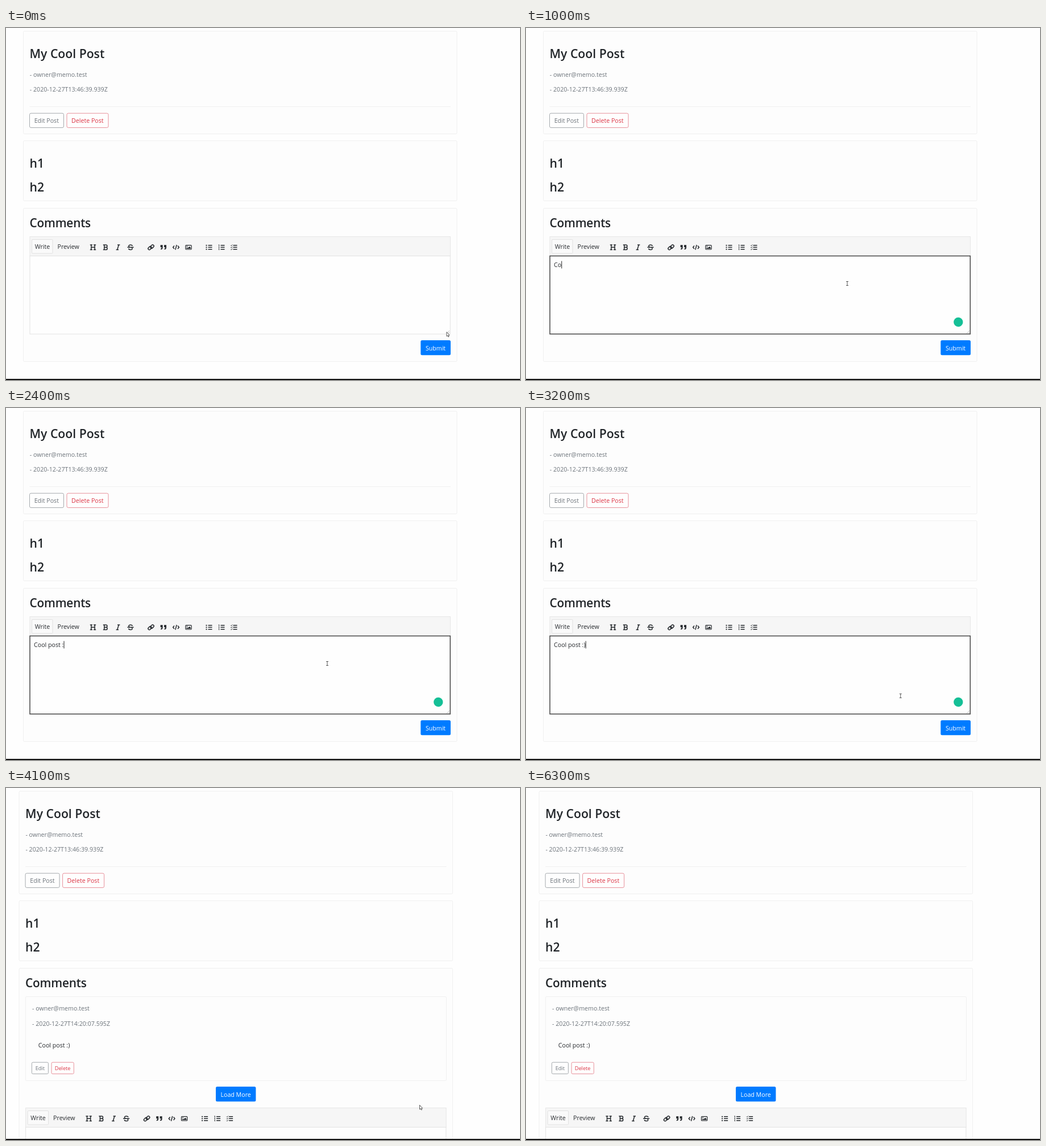
Recreate the animation shown at these times as an HTML page. Size 904 px wide and 620 px high, loop 6.6 s.

```html
<!DOCTYPE html>
<html lang="en">
<head>
<meta charset="utf-8">
<title>Post and comments</title>
<style>
  html, body { margin: 0; width: 100%; height: 100%; overflow: hidden; background: #fefefe; }
  svg { display: block; width: 904px; height: 620px; }
  text { font: 10.65px "Open Sans", "Noto Sans", sans-serif; fill: #26292d; white-space: pre; }
  .head { font-size: 20.8px; font-weight: 600; letter-spacing: -.2px; fill: #212529; }
  .title { font-size: 21.2px; letter-spacing: 0; }
  .muted { fill: #6c737a; }
  .mid { text-anchor: middle; }
  .small { font-size: 9.2px; }
  .white { fill: #fff; }
  .red { fill: #dc3545; }
  .card { fill: #fdfdfd; stroke: #f0f0f0; }
  .line { stroke: #f0f0f0; fill: none; }
  .grey-btn { fill: #fefefe; stroke: #a6aaae; }
  .red-btn { fill: #fefefe; stroke: #e8919b; }
  .blue-btn { fill: #007bff; }
  .icon { fill: none; stroke: #24282c; stroke-width: 1.5; }
  .icon .solid { fill: #24282c; stroke: none; }
</style>
</head>
<body>
<svg viewBox="0 0 904 620">
  <g id="page">
    <rect class="card" x="30.5" y="5.5" width="762.5" height="181" rx="2"/>
    <text class="head title" x="41.5" y="53">My Cool Post</text>
    <text class="muted" x="41.8" y="85.5">- owner@memo.test</text>
    <text class="muted" x="41.8" y="112">- 2020-12-27T13:46:39.939Z</text>
    <path class="line" d="M41.5 138.5H782"/>
    <rect class="grey-btn" x="41.5" y="150.2" width="60" height="25.3" rx="2.5"/>
    <text class="muted mid" x="71.3" y="167">Edit Post</text>
    <rect class="red-btn" x="107" y="150.2" width="73" height="25.3" rx="2.5"/>
    <text class="red mid" x="143.3" y="167">Delete Post</text>

    <rect class="card" x="30.5" y="198.5" width="762.5" height="106" rx="2"/>
    <text class="head title" x="41.5" y="246">h1</text>
    <text class="head title" x="41.5" y="288">h2</text>

    <rect class="card" id="commentCard" x="30.5" y="317.5" width="762.5" height="270" rx="2"/>
    <text class="head" x="41.5" y="350.5">Comments</text>

    <g id="comment">
      <rect class="card" x="41.8" y="367.5" width="740" height="148" rx="2"/>
      <text class="muted" x="53.5" y="392">- owner@memo.test</text>
      <text class="muted" x="53.5" y="419">- 2020-12-27T14:20:07.595Z</text>
      <text x="64.2" y="457">Cool post :)</text>
      <rect class="grey-btn" x="52.8" y="483.2" width="29" height="20.3" rx="2"/>
      <text class="muted mid small" x="67.3" y="497">Edit</text>
      <rect class="red-btn" x="87.5" y="483.2" width="39.2" height="20.3" rx="2"/>
      <text class="red mid small" x="107" y="497">Delete</text>
      <rect class="blue-btn" x="376.4" y="526" width="70.4" height="26.3" rx="2.5"/>
      <text class="white mid" x="411.5" y="543.5">Load More</text>
    </g>

    <g id="editor">
      <rect x="42" y="367.5" width="739.5" height="34" fill="#f6f6f6" stroke="#e6e6e6"/>
      <rect x="45.5" y="372.5" width="36.5" height="24.5" rx="1.5" fill="#fafafa" stroke="#e1e1e1"/>
      <text class="mid" x="64" y="389">Write</text>
      <text class="mid" x="109.7" y="389">Preview</text>
      <g id="tools" class="icon"></g>
      <rect id="area" x="42" y="401.5" width="739.3" height="137.5" fill="#fefefe"/>
      <path d="M775 538l5-5M778 538l2-2" stroke="#aaa" stroke-width=".8"/>
      <text id="typed" x="49" y="421"></text>
      <path id="caret" d="M0 410.5v13" stroke="#222"/>
      <circle id="badge" cx="760.3" cy="518" r="8.2" fill="#15bf96"/>
      <rect id="submit" class="blue-btn" x="729.3" y="550" width="52.7" height="26.3" rx="2.5"/>
      <text class="white mid" x="755.5" y="567.5">Submit</text>
    </g>
  </g>
  <g id="pointer" stroke="#333" stroke-width=".8" fill="#fff" stroke-linejoin="round">
    <path id="arrow" d="M0 0V7.6L1.7 6.1L2.9 8.6L4.1 8.1L3 5.6H5.1Z"/>
    <path id="beam" fill="none" d="M-2-3.5h4M0-3.5v7M-2 3.5h4"/>
    <path id="hand" d="M-.8 6V.7Q0-.5.8.7V4l3 .8q1 .4.8 1.6L4 10H.4L-2.4 6.6Q-2.4 5-.8 6Z"/>
  </g>
  <rect y="618" width="904" height="2" fill="#111"/>
</svg>
<script>
const LOOP = 6600, STEP = 100, POSTED = 4100;
const $ = id => document.getElementById(id);
const show = (id, on) => $(id).setAttribute('visibility', on ? 'visible' : 'hidden');

const stroke = d => `<path d="${d}"/>`;
const solid = d => `<path class="solid" d="${d}"/>`;
const rows = [-3.5, 0, 3.5];
const list = mark => stroke(rows.map(y => `M-1.5 ${y}h7`).join('')) + rows.map(mark).join('');
const quote = 'h4v4.5q0 3.5-3.5 3.5v-1.6q1.6 0 1.6-2.4h-2.1z';

const icons = [
  [153, stroke('M-5.2-4.2h4.2M1-4.2h4.2M-5.2 4.2h4.2M1 4.2h4.2M-3.1-4v8M3.1-4v8M-3 0h6')],
  [175, stroke('M-4.2-4.2H.8a2 2 0 0 1 0 4.2H-2M1 0a2.1 2.1 0 0 1 0 4.2H-4.2M-2.2-4v8')],
  [197, stroke('M-1-4.2h4.4M-3.4 4.2H1M1.2-4l-2.4 8')],
  [219, stroke('M-5.6 0H5.6M3.2-2.3C3-5-3.4-5-3.2-2.2Q-3-.8-1 0M2 .6Q3.5 1.6 3 3C2 5-3.2 4.7-3.3 2.1')],
  [255, '<g transform="rotate(-45)"><rect x="-5.8" y="-2.7" width="6.8" height="4.4" rx="2.2"/>' +
        '<rect x="-1" y="-1.7" width="6.8" height="4.4" rx="2.2"/></g>'],
  [277, solid('M-5.4-4' + quote + 'M1-4' + quote)],
  [299, stroke('M-3-2.7L-5.3 0L-3 2.7M3-2.7L5.3 0L3 2.7M1.1-4.3L-1.1 4.3')],
  [321, '<rect x="-5.1" y="-3.7" width="10.2" height="7.4" rx="1" stroke-width="1.2"/>' +
        solid('M-3.8 2.4V1.4l1.3-1.2L-1.2 1.2L1.7-1.5L3.8.6v1.8zM-3.4-1.6a.9.9 0 1 1 1.8 0a.9.9 0 1 1-1.8 0')],
  [357, list(y => `<circle class="solid" cx="-4.5" cy="${y}" r="1.1"/>`)],
  [379, list(y => `<path stroke-width="1" d="M-5.2 ${y - 1}h.9v2.4"/>`)],
  [401, list(y => `<path stroke-width="1" d="M-5.8 ${y}l1 1l2-2.2"/>`)]
];
$('tools').innerHTML = icons.map(([x, art]) => `<g transform="translate(${x} 386.3)">${art}</g>`).join('');

const message = 'Cool post :)';
const keyTimes = [800, 900, 1300, 1400, 1500, 1600, 1700, 1800, 1900, 2000, 2300, 2700];

// time, x, y of the pointer tip
const moves = [
  [0, 775, 535.5], [400, 565, 450], [2900, 565, 450], [3500, 752.5, 564],
  [4000, 752.5, 564], [4100, 727.5, 558.5], [4300, 600, 606], [4500, 540, 640]
];
const ease = p => p * p * (3 - 2 * p);

function pointerAt(t) {
  const i = moves.findIndex(m => m[0] > t);
  if (i < 0) return moves[moves.length - 1].slice(1);
  const [t0, x0, y0] = moves[i - 1], [t1, x1, y1] = moves[i];
  const p = ease((t - t0) / (t1 - t0));
  return [x0 + (x1 - x0) * p, y0 + (y1 - y0) * p];
}

function draw(t) {
  const posted = t >= POSTED, focused = t >= 400 && !posted;
  $('page').setAttribute('transform', `translate(${posted ? -7.4 : 0} 0)`);
  $('editor').setAttribute('transform', `translate(0 ${posted ? 196 : 0})`);
  $('commentCard').setAttribute('height', posted ? 466 : 270);
  show('comment', posted);

  $('area').setAttribute('stroke', focused ? '#444' : '#e2e2e2');
  $('area').setAttribute('stroke-width', focused ? 1.5 : 1);
  $('typed').textContent = posted ? '' : message.slice(0, keyTimes.filter(k => k <= t).length);
  const end = 49.6 + (t >= 800 && !posted ? $('typed').getComputedTextLength() : 0);
  $('caret').setAttribute('transform', `translate(${end} 0)`);
  show('caret', focused && t < 3300);
  show('badge', focused && t >= 700);

  const [x, y] = pointerAt(t);
  const over = !posted && x > 729 && x < 782 && y > 550 && y < 577;
  const inText = !posted && t > 0 && x > 42 && x < 773 && y > 402 && y < 538;
  $('submit').style.fill = over ? '#0069d9' : '';
  $('pointer').setAttribute('transform', `translate(${x} ${y})`);
  show('hand', over);
  show('beam', inText);
  show('arrow', !over && !inText);
}

const start = performance.now();
function tick() {
  const t = (performance.now() - start) % LOOP;
  draw(Math.floor(t / STEP) * STEP);
  requestAnimationFrame(tick);
}
tick();
</script>
</body>
</html>
```
